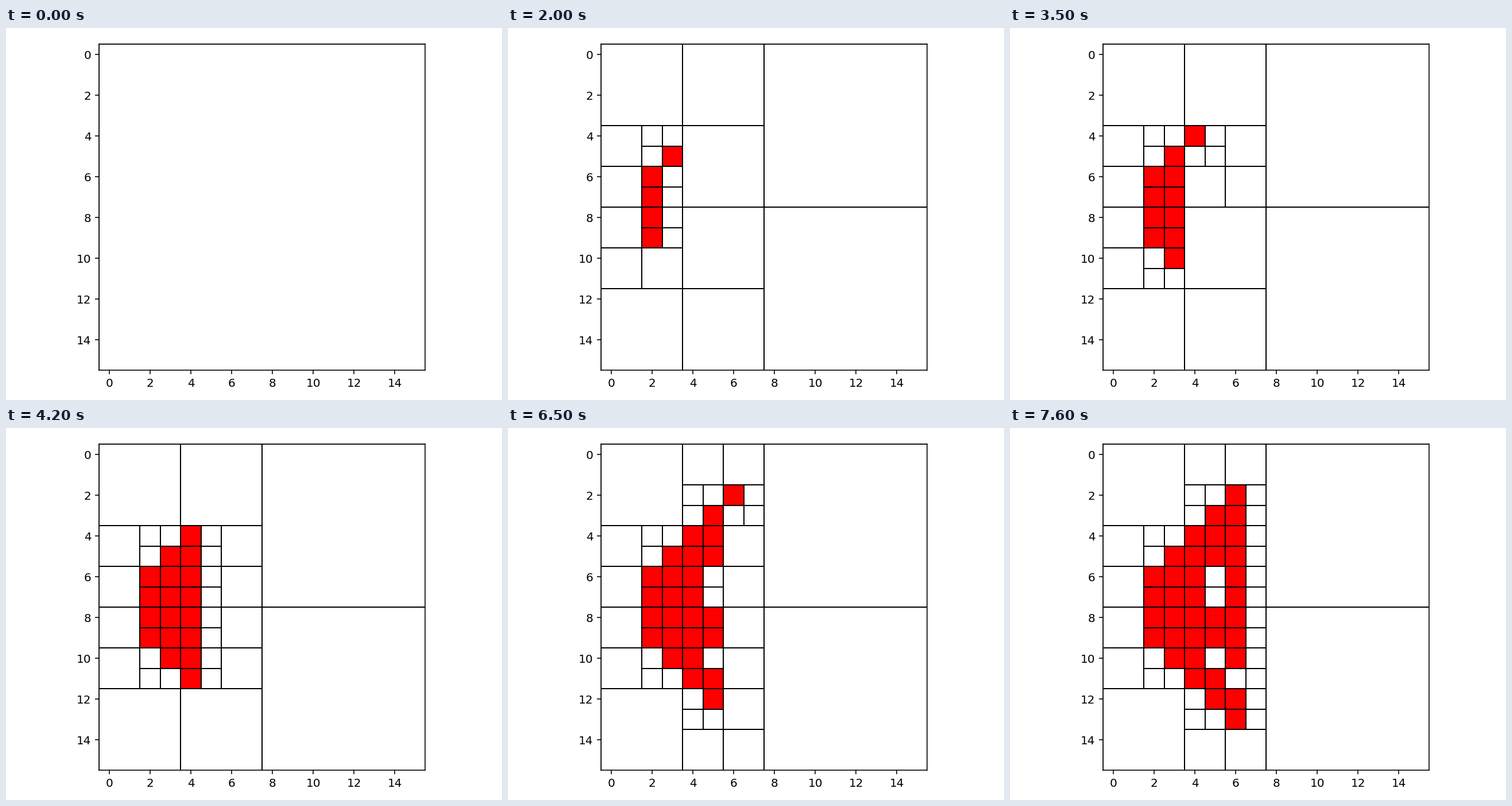
Write a matplotlib script that moves like this. It is 864 px wide and 648 px high and loops after 8 s.

```python
import matplotlib.pyplot as plt
from matplotlib.animation import FuncAnimation
from matplotlib.patches import Rectangle

W, H, DPI = 864, 648, 144
LEFT, TOP, SIDE = 162.3, 28.3, 568.19
GRID = 16
FRAMES, INTERVAL = 80, 100
NUDGE = 0.0005  # pushes the outer right and bottom edges past the clip

# Filled rows of each column
COLUMNS = {
    2: [*range(6, 10)],
    3: [*range(5, 11)],
    4: [*range(4, 12)],
    5: [3, 4, 5, 8, 9, 11, 12],
    6: [*range(2, 11), 12, 13],
}
CELLS = [(x, y) for x, rows in COLUMNS.items() for y in rows]


def fill_step(x, y):
    """The scan runs down one column after another, a cell per step."""
    return GRID * (x - 2) + y - 1


def leaves(x, y, size, cells):
    """Yield the quadtree leaves of a square as (x, y, size, filled)."""
    inside = [(cx, cy) for cx, cy in cells
              if x <= cx < x + size and y <= cy < y + size]
    if size == 1 or not inside:
        yield x, y, size, bool(inside)
        return
    half = size // 2
    for dy in (0, half):
        for dx in (0, half):
            yield from leaves(x + dx, y + dy, half, inside)


fig = plt.figure(figsize=(W / DPI, H / DPI), dpi=DPI, facecolor="white")
ax = fig.add_axes([LEFT / W, (H - TOP - SIDE) / H, SIDE / W, SIDE / H])
ax.set_xlim(-0.5, GRID - 0.5)
ax.set_ylim(GRID - 0.5, -0.5)
ax.set_xticks(range(0, GRID, 2))
ax.set_yticks(range(0, GRID, 2))


def update(step):
    for patch in list(ax.patches):
        patch.remove()
    cells = [c for c in CELLS if fill_step(*c) <= step]
    for x, y, size, filled in leaves(0, 0, GRID, cells):
        ax.add_patch(Rectangle(
            (x - 0.5, y - 0.5), size + NUDGE, size + NUDGE, linewidth=1,
            edgecolor="black", facecolor="red" if filled else "white"))
    return ax.patches


anim = FuncAnimation(fig, update, frames=FRAMES, interval=INTERVAL,
                     repeat=True, repeat_delay=0, blit=False)
plt.show()
```
